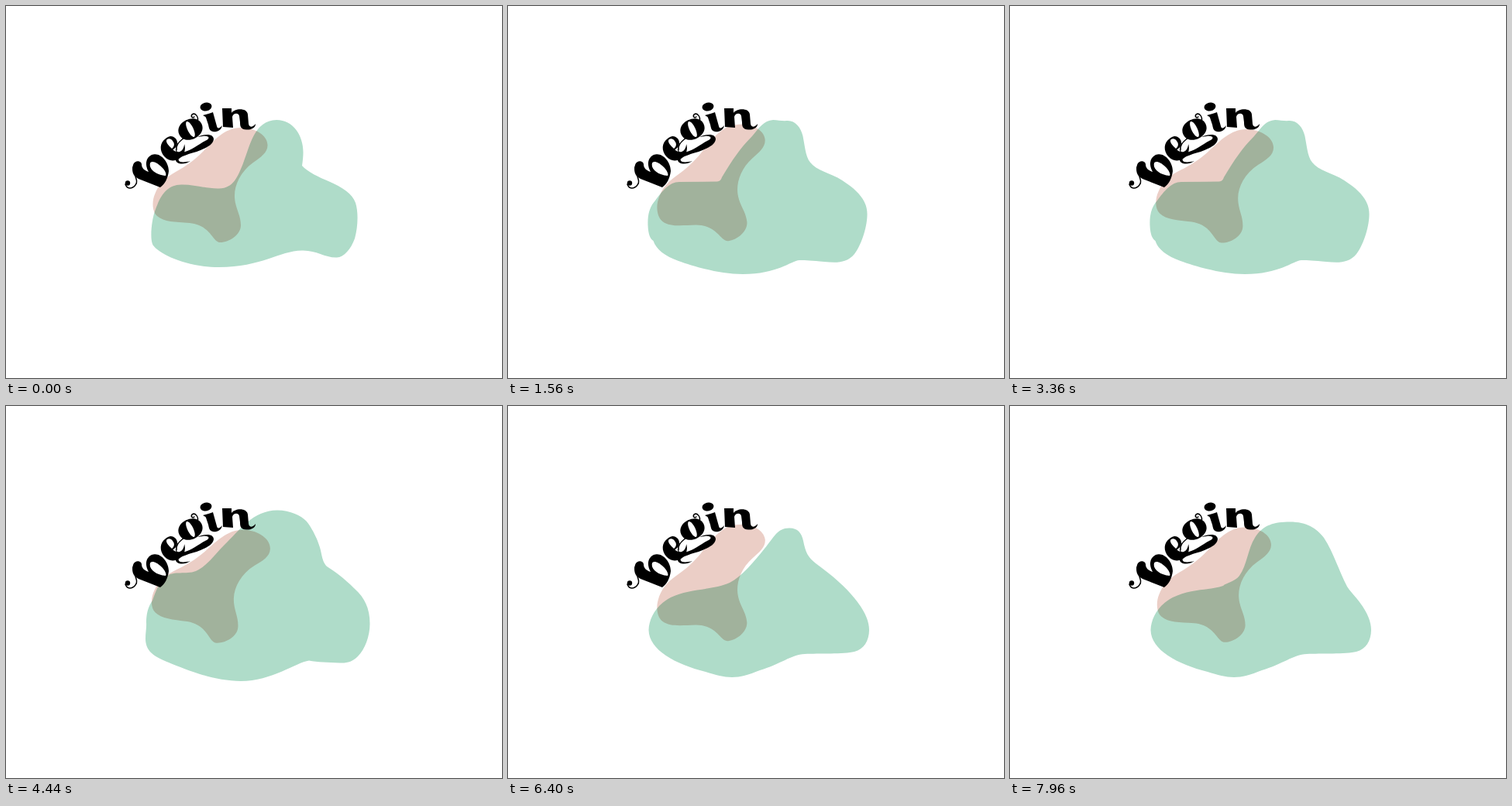
An HTML page that plays this animation: 640 px wide and 480 px high, repeating every 8 s.

```html
<!DOCTYPE html>
<html lang="en">
<head>
<meta charset="utf-8">
<title>begin</title>
<style>
  html, body { margin: 0; width: 100%; height: 100%; overflow: hidden; background: #fff; }
  svg { display: block; width: 100vw; height: 100vh; background: #fff; }
  #green { fill: #afdcc9; }
  #pink { fill: #ebcec6; mix-blend-mode: multiply; }
  .thin { fill: none; stroke: #000; stroke-width: 1.5; stroke-linecap: round; }
</style>
</head>
<body>
<svg viewBox="0 0 640 480" role="img" aria-label="begin">
  <path id="green"/>
  <path id="pink" d="M303,157 C322,157 337,167 337.5,179 C338,189 329,195 319,202
    C302,214 294.5,232 295,246 C295.5,261 303,269 303,283 C303,295 288,305 276.5,305
    C266,305 265,283 237,280 C218,278.5 204,279 195,271 C188,265 188.5,251 192,243
    C197,230 205,222 219,214 C232,207 243,199 254,188 C268,174 282,157 303,157Z"/>
  <g fill-rule="evenodd">
    <!-- b -->
    <path d="M164,205 C166,199 174,199 175,204 C175,209 178,212 184,214 C179,205 180,196 188,192
      C199,188 210,201 210,213 C209,222 205,230 199,234 L171,223 C163,219 162,212 164,205Z
      M186,203 C184,210 193,218 206,219 C209,214 196,201 189,201 C187,201 186,202 186,203Z"/>
    <path class="thin" d="M164,208 C164,217 172,226 167,231 C162,237 156,236 154,230"/>
    <circle cx="157" cy="228.500" r="3.200"/>
    <!-- e -->
    <path transform="translate(214 184) rotate(-40)" d="M3,-15 C-8,-16 -14,-8 -14,1 C-14,11 -7,16 2,16
      C9,16 14,11 16,6 C10,12 2,12 0,2 C8,3 13,-2 12,-8 C11,-13 8,-15 3,-15Z
      M3,-13 C6,-13 8,-10 7,-5 C6,-1 3,0 0,0 C-1,-6 -1,-13 3,-13Z"/>
    <!-- g -->
    <path transform="translate(238 159) rotate(-26)" d="M0,-13 C9,-13 16,-8 16,0 C16,8 9,13 0,13
      C-9,13 -16,8 -16,0 C-16,-8 -9,-13 0,-13Z
      M0,-11 C-5,-10 -5,10 0,11 C5,10 5,-10 0,-11Z"/>
    <path class="thin" d="M247,149 C249,143 244,137 240,140 C238,143 241,145 243,143"/>
    <path class="thin" d="M230,170 C222,176 219,180 220,186"/>
    <path d="M219,184 C219,190 227,190 234,187 C246,182 252,176 259,173 C264,170 261,167 254,168
      L247,169 C258,164 268,165 268,172 C267,180 256,184 246,188 C236,191 228,193 223,197
      C221,201 227,203 238,200 C229,206 217,204 219,196 C220,193 222,192 224,191 C220,190 218,187 219,184Z"/>
    <!-- i -->
    <ellipse cx="258" cy="130" rx="7.500" ry="5.400" transform="rotate(-12 258 130)"/>
    <path d="M254,141 C259,140 264,138 267,137 L272,155 C273,159 276,158 279,154
      C278,161 271,163 267,162 C262,161 262,157 261,153 L258,144 C257,142 255,142 254,141Z"/>
    <!-- n -->
    <path d="M279,132 L291,132 L291,138 C295,132 311,131 312,140 L313,152 C314,157 318,157 322,152
      C322,158 315,160 310,159.500 C303,159 302,156 302,150 L301,142 C300,137 293,138 292,143
      L293,157 L280,156Z"/>
  </g>
</svg>
<script>
const LOOP = 8000;
const SWAY = { period: 5200, peak: 4030, degrees: 5.4, center: "263.5 231" };
const FIRST_SWAP = 1480, SWAP_EVERY = 2000;

const wideBase = `C460,264 466,277 466,289 C466,303 459,314 447,317 C434,320.5 400,319 383,320
  C365,321 352,333 325,341 C310,347 300,350 289,350 C278,350 268,347 255,343
  C216,333 182,315 181.5,289 C182,274 191,257 210,247`;

const blobs = [
  `M349,147 C371,147 384,168 383.5,190 C383.3,198 382,206 382,206 C389,214 404,221 416,226
   C434,234 447,242 451,254 C455,266 454,286 450,300 C445,314 436,324 427,324.5
   C411,325 401,315 382,315.5 C352,316 330,337 275,337 C232,337 198,320 190,309
   C185,302 188,276 192,265 C199,245 207,231 226,230.5 C243,230 258,236 275,235.5
   C294,235 299,220 306,203 C315,180 320,148 349,147Z`,
  `M342,147 C349,147.5 354,148.5 361,148 C371,148 378,157 380.5,168 C384,186 384,197 393,205
   C404,215 422,217 437,229 C456,242 464,255 463.5,270 C463,288 455,310 447,320
   C437,332 424,331.5 408,330 C392,328.5 385,328 376,328 C365,329 347,346 303,346
   C272,346 240,336 220,329 C203,323 191,314 187.5,303 C183,300 181,294 180.5,283
   C180,268 183,259 190,251 C199,239 208,227 221,227 L270,226.5 C273,226.5 275,224 276,221
   C290,198 299,184 315,168 C325,156 330,148 342,147Z`,
  `M350,134.5 C367,134.5 381,142 387,148 C395,157 405,177 407,191 C408.5,198 410,203 414,207
   C425,214 436,222 449,235 C464,248 469.5,263 469.5,281 C469.5,297 463,314 454,323
   C447,330 440,332 431,331.5 C415,331 402,330.5 391,328.5 C374,331 343,355 303,355
   C268,355 232,340 210,331 C190,323 180,316 180,300 C180,292 181.5,286 181,279
   C181,267 184,258 189,251 C193,240 197,227 207,220 C217,212 232,218 245,213
   C260,206 267,194 281,180 C302,160 318,135 350,134.5Z`,
  `M363,157.5 C374,157.5 379,164 381,174 C384,189 387,195 397,203 C419,219 435,233 447.5,248.5
   ${wideBase} C234,235 264,238 286,228 C302,220 318,200 331,184 C343,170 347,157.5 363,157.5Z`,
  `M361,149.5 C383,149.5 396,158 405,170 C418,190 424,212 435,233 C438,238 443,243 447.5,248.5
   ${wideBase} C234,235 258,238 275,232 C279,228 290,227 296,219 C306,205 307,184 316,170
   C326,153 342,149.5 361,149.5Z`
];

const green = document.getElementById("green");
const pink = document.getElementById("pink");
const sway = t => SWAY.degrees * Math.cos(2 * Math.PI * (t - SWAY.peak) / SWAY.period);
let shown = -1;

function draw(t) {
  const index = Math.floor((t - FIRST_SWAP) / SWAP_EVERY) + 1;
  if (index !== shown) green.setAttribute("d", blobs[shown = index]);
  pink.setAttribute("transform", `rotate(${sway(t) - sway(0)} ${SWAY.center})`);
}

const start = performance.now();
function tick() {
  draw((performance.now() - start) % LOOP);
  requestAnimationFrame(tick);
}
draw(0);
requestAnimationFrame(tick);
</script>
</body>
</html>
```
